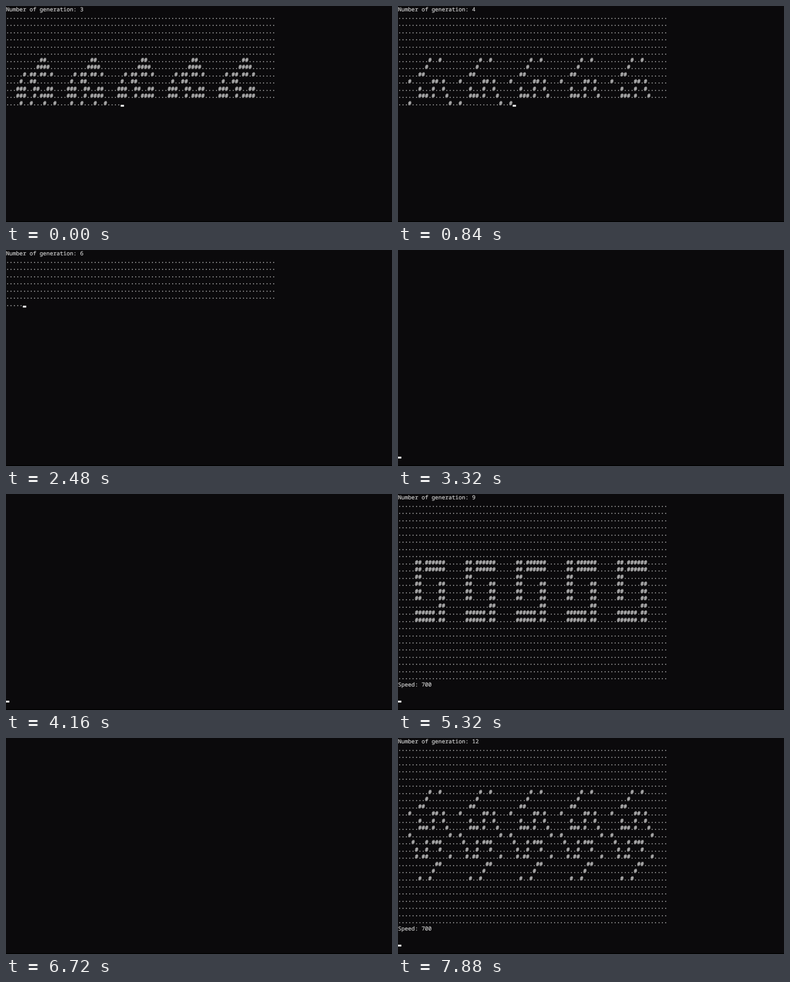
Animation, 720 px wide and 405 px high, one loop 8.12 s. Source, as an HTML page:

```html
<!DOCTYPE html>
<html lang="en">
<head>
<meta charset="utf-8">
<title>Game of Life console</title>
<style>
  html, body { margin: 0; width: 100%; height: 100%; overflow: hidden; background: #0b0a0c; }
  svg { display: block; width: 100%; height: 100%; }
  text {
    font: 10.483px "Noto Sans Mono", "DejaVu Sans Mono", monospace;
    fill: #d2d2d2;
    stroke: #d2d2d2;
    stroke-width: 0.2;
    text-rendering: geometricPrecision;
    font-variant-ligatures: none;
  }
  text.cells { stroke-width: 0.42; }
</style>
</head>
<body>
<svg id="stage" viewBox="0 0 720 405">
  <rect width="720" height="405" fill="#0b0a0c"/>
  <rect y="403.5" width="720" height="1.5" fill="#000"/>
</svg>
<script>
const LOOP = 8120, TICK = 40;
const COLS = 80, ROWS = 25, LINES = 29;
const CELL_W = 6.29, CELL_H = 13.48, BASELINE = 10.4;
const FIRST_GENERATION = 3;
const PRINT_SPAN = 160;

// One entry per generation: screen cleared, first output, output complete, print span.
const schedule = [
  [-120, -80, 80],
  [800, 840, 920],
  [1640, 1720, 1720],
  [2360, 2480, 2600],
  [3320, 3360, 3480],
  [4160, 4200, 4480, 280],
  [5000, 5080, 5120],
  [5880, 5920, 6000],
  [6600, 6720, 6880],
  [7560, 7640, 7720]
];

const galaxy = [
  "##.######",
  "##.######",
  "##.......",
  "##.....##",
  "##.....##",
  "##.....##",
  ".......##",
  "######.##",
  "######.##"
];

function seedGrid() {
  const grid = Array.from({ length: ROWS }, () => Array(COLS).fill(0));
  for (let left = 5; left < COLS; left += 15) {
    galaxy.forEach((line, r) => [...line].forEach((ch, c) => {
      grid[8 + r][left + c] = ch === "#" ? 1 : 0;
    }));
  }
  return grid;
}

function nextGrid(grid) {
  const at = (r, c) => (grid[r] && grid[r][c]) || 0;
  return grid.map((row, r) => row.map((alive, c) => {
    let sum = -alive;
    for (let dr = -1; dr <= 1; dr++)
      for (let dc = -1; dc <= 1; dc++) sum += at(r + dr, c + dc);
    return sum === 3 || (alive && sum === 2) ? 1 : 0;
  }));
}

function screenText(grid, generation) {
  const rows = grid.map(row => row.map(v => v ? "#" : ".").join(""));
  return [`Number of generation: ${generation}`, ...rows, "Speed: 700", "", ""].join("\n");
}

const screens = [];
let grid = seedGrid();
for (let n = 1; screens.length < schedule.length; n++) {
  if (n >= FIRST_GENERATION) screens.push(screenText(grid, n));
  grid = nextGrid(grid);
}

const stage = document.getElementById("stage");

function add(tag, attrs) {
  const el = document.createElementNS("http://www.w3.org/2000/svg", tag);
  for (const key in attrs) el.setAttribute(key, attrs[key]);
  return stage.appendChild(el);
}

const lineEls = Array.from({ length: LINES }, (_, i) => add("text", {
  x: 0,
  y: (BASELINE + i * CELL_H).toFixed(2),
  class: i >= 1 && i <= ROWS ? "cells" : "label"
}));
const cursor = add("rect", { width: CELL_W, height: 3.4, fill: "#f2f2f2" });

function placeCursor(col, line) {
  cursor.setAttribute("x", col * CELL_W);
  cursor.setAttribute("y", line * CELL_H + 10.1);
}

function render(time) {
  const t = Math.floor((time % LOOP) / TICK) * TICK;
  const index = schedule.findLastIndex(([clear]) => clear <= t);
  const [, print, full, span = PRINT_SPAN] = schedule[index];
  const waiting = t < print;
  const progress = waiting ? 0 : Math.min(1, Math.max(0, 1 - (full - t) / span));
  const text = screens[index];
  const lines = text.slice(0, Math.floor(text.length * progress)).split("\n");

  lineEls.forEach((el, i) => {
    const value = lines[i] || "";
    if (el.textContent !== value) el.textContent = value;
  });

  // The cursor rests on the last line until new output begins.
  if (waiting) placeCursor(0, LINES - 1);
  else placeCursor(lines[lines.length - 1].length, lines.length - 1);
  cursor.setAttribute("visibility", waiting || progress > 0 ? "visible" : "hidden");
}

const start = performance.now();
function frame() {
  render(performance.now() - start);
  requestAnimationFrame(frame);
}
frame();
</script>
</body>
</html>
```
